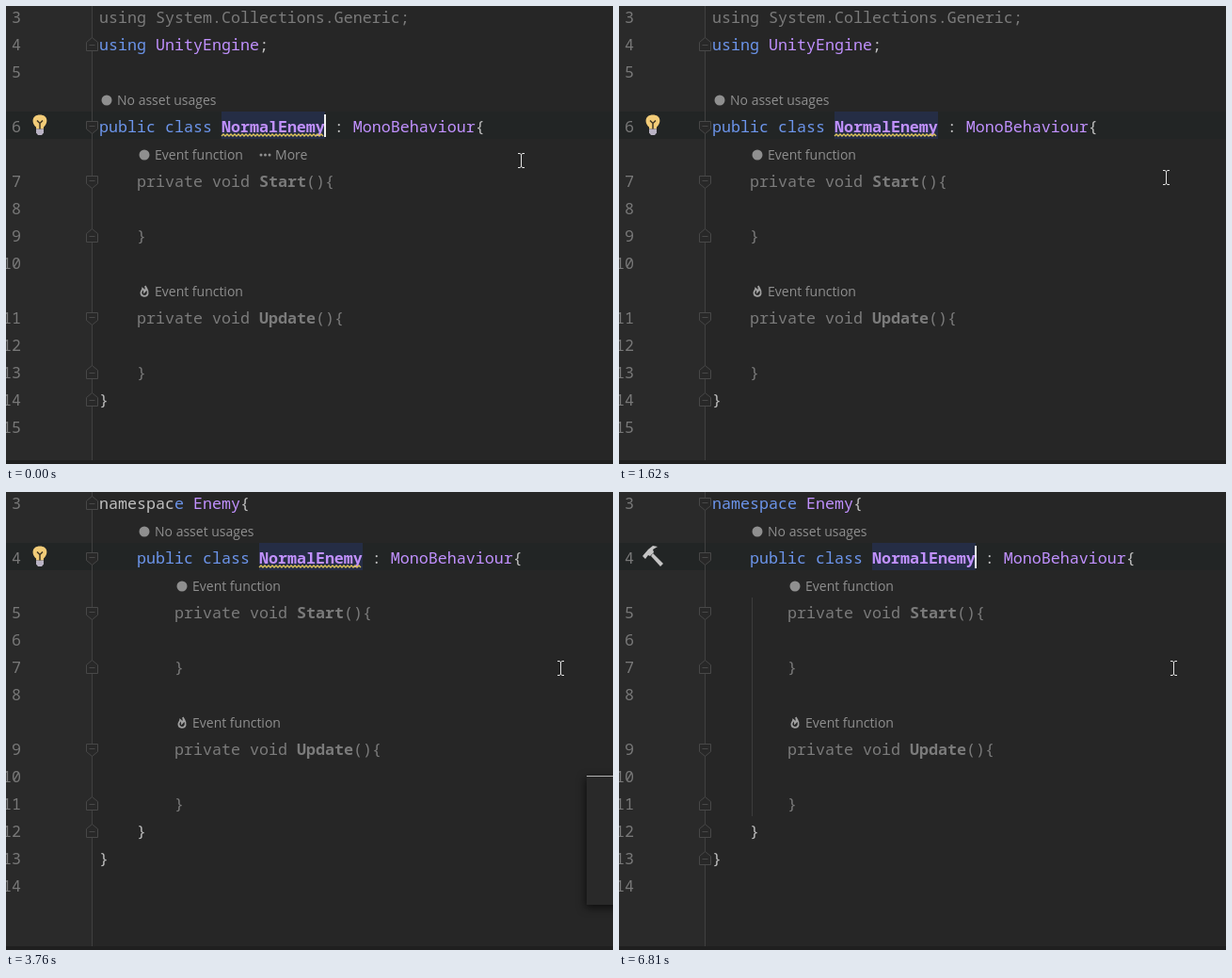
Write an HTML page that moves like this. It is 645 px wide and 486 px high and loops after 7190 ms.

```html
<!DOCTYPE html>
<html lang="en">
<head>
<meta charset="utf-8">
<title>Move class to namespace</title>
<style>
html, body { margin: 0; width: 100%; height: 100%; overflow: hidden; background: #262626; }
svg { display: block; width: 645px; height: 486px; }
text { white-space: pre; }
.code { font: 16.67px "Noto Sans Mono", monospace; fill: #c0c0c0; }
.num { font: 16.67px "Noto Sans Mono", monospace; fill: #787878; text-anchor: end; }
.kw { fill: #6c95eb; }
.type { fill: #c191ff; }
.dim { fill: #7b7b7b; }
.bold { font-weight: 700; }
.hint { font: 14px "Open Sans", sans-serif; fill: #8f8f8f; }
.item { font: 11.3px "Open Sans", sans-serif; fill: #c8c8c8; }
.item.chosen { fill: #e2e2e2; }
.keys { font: 11.6px "Open Sans", sans-serif; fill: #777; text-anchor: end; }
.foot { font: 9.5px "Open Sans", sans-serif; fill: #949494; }
.fold { fill: #282828; stroke: #484848; }
.wave { fill: none; stroke: #dcc35a; stroke-width: 1.4; }
.line { fill: none; stroke: #c0c0c0; stroke-width: 1.5; }
.solid { fill: #c4c4c4; }
.popup { filter: drop-shadow(-1px 3px 5px #000a); }
</style>
</head>
<body>
<svg id="stage" viewBox="0 0 645 486" xmlns="http://www.w3.org/2000/svg"></svg>
<script>
const LOOP = 7190, ROW = 29, LEFT = 99, CELL = 10;

const escapeText = s => s.replace(/&/g, '&amp;').replace(/</g, '&lt;');
const text = (cls, x, y, s) => `<text class="${cls}" x="${x}" y="${y}">${escapeText(s)}</text>`;
const rect = (x, y, w, h, fill) =>
  `<rect x="${x}" y="${y}" width="${w}" height="${h}" fill="${fill}"/>`;
const path = (cls, d) => `<path class="${cls}" d="${d}"/>`;
const at = (x, y, content, scale = 1) =>
  `<g transform="translate(${x} ${y}) scale(${scale})">${content}</g>`;
const group = (id, content) => `<g id="${id}">${content}</g>`;

// Code line centred on y; parts alternate class and text.
function code(indent, y, ...parts) {
  let spans = '';
  for (let i = 0; i < parts.length; i += 2)
    spans += `<tspan class="${parts[i]}">${escapeText(parts[i + 1])}</tspan>`;
  return `<text class="code" x="${LEFT + indent * CELL}" y="${y + 6}">${spans}</text>`;
}

const numbers = ys => ys.map((y, i) => text('num', 16, y + 6, String(i + 3))).join('');
const foldOpen = y => at(91.5, y + .5, path('fold', 'M-6 -6H6V2L0 7L-6 2ZM-3 -1H3'));
const foldClose = y => at(91.5, y - .5, path('fold', 'M-6 7H6V-2L0 -7L-6 -2ZM-3 1H3'));
const dot = (x, y) => `<circle cx="${x}" cy="${y}" r="5.5" fill="#8f8f8f"/>`;
const flame = (x, y) => at(x, y,
  '<path fill="none" stroke="#a0a0a0" stroke-width="2" d="M1 -6C2 -3 5 -1 4 3C3 7 -4 7 -4 2C-4 0 -2 -1 -2 -3C0 -2 0 0 0 1C2 -1 2 -4 1 -6Z"/>', .9);

const icons = {
  bulb: '<path d="M0 -10C9 -10 9 -1 4 3V5H-4V3C-9 -1 -9 -10 0 -10Z" fill="#f2cc78"/>' +
    '<path d="M-4 5H4V9L2 11.500H-2L-4 9Z" fill="#b9b3c4"/>' +
    '<path d="M-3 -4L0 -1L3 -4M0 -1V5" fill="none" stroke="#3f3524" stroke-width="1.5"/>',
  hammer: path('solid', 'M-11 0L-5 -7L0 -11L5 -10L0 -7L1 -4L-3 0L-5 -1L-8 3Z') +
    path('solid', 'M0 -3L11 8L8 11L-2 0Z'),
  wrench: path('solid', 'M-6 -3L-3 0L0 -3L-3 -6C2 -7 4 -3 2 0L7 5L5 7L0 2C-3 4 -7 1 -6 -3Z'),
  events: '<path d="M-8 0H-1M-4 -3L-1 0L-4 3" fill="none" stroke="#9cc4c4" stroke-width="1.5"/>' +
    '<g class="line"><circle cx="4" cy="-3" r="1.7"/><circle cx="4" cy="3" r="1.7"/></g>',
  tree: path('line', 'M0 -4V0L-4 5M0 0L4 5') + path('solid', 'M-2 -6H2V-2H-2ZM-6 3H-3V6H-6ZM3 3H6V6H3Z'),
  compass: '<circle class="line" r="6"/>' + path('solid', 'M-2 -5L2 -1V5L-2 2Z'),
  prism: path('line', 'M0 -6L-6 4L0 6L6 4Z') + path('solid', 'M0 -6L6 4L0 6Z'),
  agent: path('solid', 'M-3 -7H3V-4H5V-3H-5V-4H-3ZM-3 -2H3V0L1 2H-1L-3 0ZM-5 7V4L-2 2L0 4L2 2L5 4V7Z')
};

// Class body in its first position; it moves as one piece when wrapped.
const classText =
  rect(229, 112, 110, ROW, '#252d45') +
  dot(107, 100) + text('hint', 118, 105, 'No asset usages') +
  code(0, 128, 'kw', 'public class ', 'type bold', 'NormalEnemy', '', ' : ', 'type', 'MonoBehaviour', '', '{') +
  dot(147, 158) + text('hint', 158, 163, 'Event function') +
  code(4, 186, 'dim', 'private void ', 'dim bold', 'Start', 'dim', '(){') +
  code(4, 244, 'dim', '}') +
  flame(147, 302.5) + text('hint', 158, 308, 'Event function') +
  code(4, 331, 'dim', 'private void ', 'dim bold', 'Update', 'dim', '(){') +
  code(4, 389, 'dim', '}') + code(0, 418, '', '}');

const classFolds = [128, 186, 331].map(foldOpen).join('') + [244, 389, 418].map(foldClose).join('');
const wave = path('wave', 'M229 138' + 'l2 -2l2 2'.repeat(27));
const currentLine = rect(0, 112, 645, ROW, '#222525') + rect(91, 112, 1, ROW, '#404040');
const caret = rect(338, 115, 2, 24, '#f0f0f0');

const before = currentLine + classText + classFolds + foldClose(41) + wave +
  at(36, 125.5, icons.bulb) +
  code(0, 12, 'dim', 'using System.Collections.Generic;') +
  code(0, 41, 'kw', 'using ', 'type', 'UnityEngine', '', ';') +
  numbers([12, 41, 70, 128, 186, 215, 244, 273, 331, 360, 389, 418, 447]) +
  group('more', [271, 275.5, 280].map(x => `<circle cx="${x}" cy="158" r="1.5" fill="#8f8f8f"/>`).join('') +
    text('hint', 286, 163, 'More'));

const after = at(0, -58, currentLine) + at(40, -58, classText) + at(0, -58, classFolds) +
  numbers([12, 70, 128, 157, 186, 215, 273, 302, 331, 360, 389, 418]) +
  code(0, 389, '', '}') +
  group('pending', foldClose(12) + at(40, -58, wave) + at(36, 67.5, icons.bulb) +
    code(0, 12, '', 'namespac', 'kw', 'e ', 'type', 'Enemy', '', '{')) +
  group('settled', foldOpen(12) + foldClose(389) + at(36, 68, icons.hammer) +
    rect(141, 112, 1, ROW * 8, '#3d3d3d') +
    code(0, 12, 'kw', 'namespace ', 'type', 'Enemy', '', '{')) +
  group('popup', `<g class="popup">${rect(617, 301, 40, 137, '#292929')}</g>` + rect(617, 301, 28, 1, '#b4b4b4'));

// Menu sections; a thin rule separates them.
const menuSections = [
  [
    ['bulb', "Move to 'Enemy' namespace", '>'],
    ['bulb', "Folder '<Assembly-CSharp>¥Assets¥Scripts¥Enemy' do not introduce namespace"],
    ['bulb', "Move file to folder '<Assembly-CSharp>'"],
    ['bulb', "Move file to folder '<Assembly-CSharp>¥Assets'"],
    ['bulb', "Move file to folder '<Assembly-CSharp>¥Assets¥Scripts'"]
  ],
  [
    ['hammer', 'Create derived type'],
    ['hammer', 'Create another part of the type'],
    ['hammer', 'To internal'],
    ['hammer', 'Add <inheritdoc />']
  ],
  [['wrench', 'Inspection: "Namespace does not correspond to file location"', '>']],
  [['events', 'Generate Nilvo event functions']],
  [['tree', 'Type Hierarchy']],
  [
    ['compass', 'Navigate To...', 'Ctrl+Shift+G'],
    ['prism', 'Refactor This...', 'Ctrl+Shift+R'],
    ['agent', 'Inspect This...', 'Ctrl+Alt+Shift+A']
  ]
];

const MENU_TOP = 142, ITEM = 20, GAP = 3;

function menuRow([icon, label, extra], top) {
  const scale = icon === 'bulb' || icon === 'hammer' ? .65 : 1;
  const style = top === MENU_TOP ? 'item chosen' : 'item';
  const end = extra === '>' ? at(465, top + 10.5, '<path d="M0 -4L6 0L0 4Z" fill="#c4c4c4"/>')
    : extra ? text('keys', 473, top + 15, extra) : '';
  return at(30, top + 10, icons[icon], scale) + text(style, 42, top + 15, label) + end;
}

function menuRows() {
  let y = MENU_TOP, out = '';
  menuSections.forEach((section, i) => {
    if (i) {
      out += rect(21, y + 1, 455, 1, '#4b4b4b');
      y += GAP;
    }
    for (const row of section) {
      out += menuRow(row, y);
      y += ITEM;
    }
  });
  return out;
}

const menu = rect(20, 141, 467, 333, '#505050') + rect(21, 142, 465, 331, '#2f2f2f') +
  rect(21, MENU_TOP, 455, ITEM, '#285384') +
  rect(476, 142, 10, 296, '#4f4f4f') + rect(476, 438, 10, 19, '#353535') +
  menuRows() +
  rect(21, 457, 465, 16, '#343434') + text('foot', 26, 469, 'Type to show actions or settings');

const pointer = '<path d="M-3 -7.5H-1L.5 -6.5L2 -7.5H4M.5 -6.5V6.5M-3 7.5H-1L.5 6.5L2 7.5H4" fill="none" stroke="#e4e4e4"/>';

const stage = document.getElementById('stage');
stage.innerHTML = rect(0, 0, 645, 486, '#262626') + rect(0, 0, 91, 486, '#2a2a2a') +
  rect(91, 0, 1, 486, '#404040') +
  group('before', before) + group('after', after) + rect(0, 482, 645, 4, '#1f1f1f') +
  group('menu', menu) + group('caret', caret) + group('pointer', pointer);

// Visible intervals in ms.
const shown = {
  before: [[0, 3710]],
  after: [[3710, LOOP]],
  more: [[0, 650]],
  menu: [[2060, 3620]],
  pending: [[3710, 3960]],
  settled: [[3960, LOOP]],
  popup: [[3760, 3910]],
  caret: [[0, 330], [830, 1330], [3960, 5310], [5810, 6310], [6810, LOOP]]
};
const pointerPath = [[60, 547, 164], [720, 565, 173], [1550, 580, 181], [2000, 589, 187]];
const parts = Object.fromEntries([...Object.keys(shown), 'pointer'].map(id => [id, document.getElementById(id)]));

function pointerAt(t) {
  const i = pointerPath.findIndex(p => p[0] >= t);
  if (i < 1) return (i ? pointerPath.at(-1) : pointerPath[0]).slice(1);
  const [a, b] = [pointerPath[i - 1], pointerPath[i]];
  const k = (t - a[0]) / (b[0] - a[0]);
  return [1, 2].map(j => Math.round(a[j] + (b[j] - a[j]) * k));
}

function draw(t) {
  for (const [id, spans] of Object.entries(shown))
    parts[id].style.display = spans.some(([from, to]) => t >= from && t < to) ? '' : 'none';
  parts.caret.setAttribute('transform', t < 3710 ? '' : 'translate(40 -58)');
  parts.pointer.setAttribute('transform', `translate(${pointerAt(t)})`);
}

const start = performance.now();
function tick() {
  draw((performance.now() - start) % LOOP);
  requestAnimationFrame(tick);
}
tick();
</script>
</body>
</html>
```
